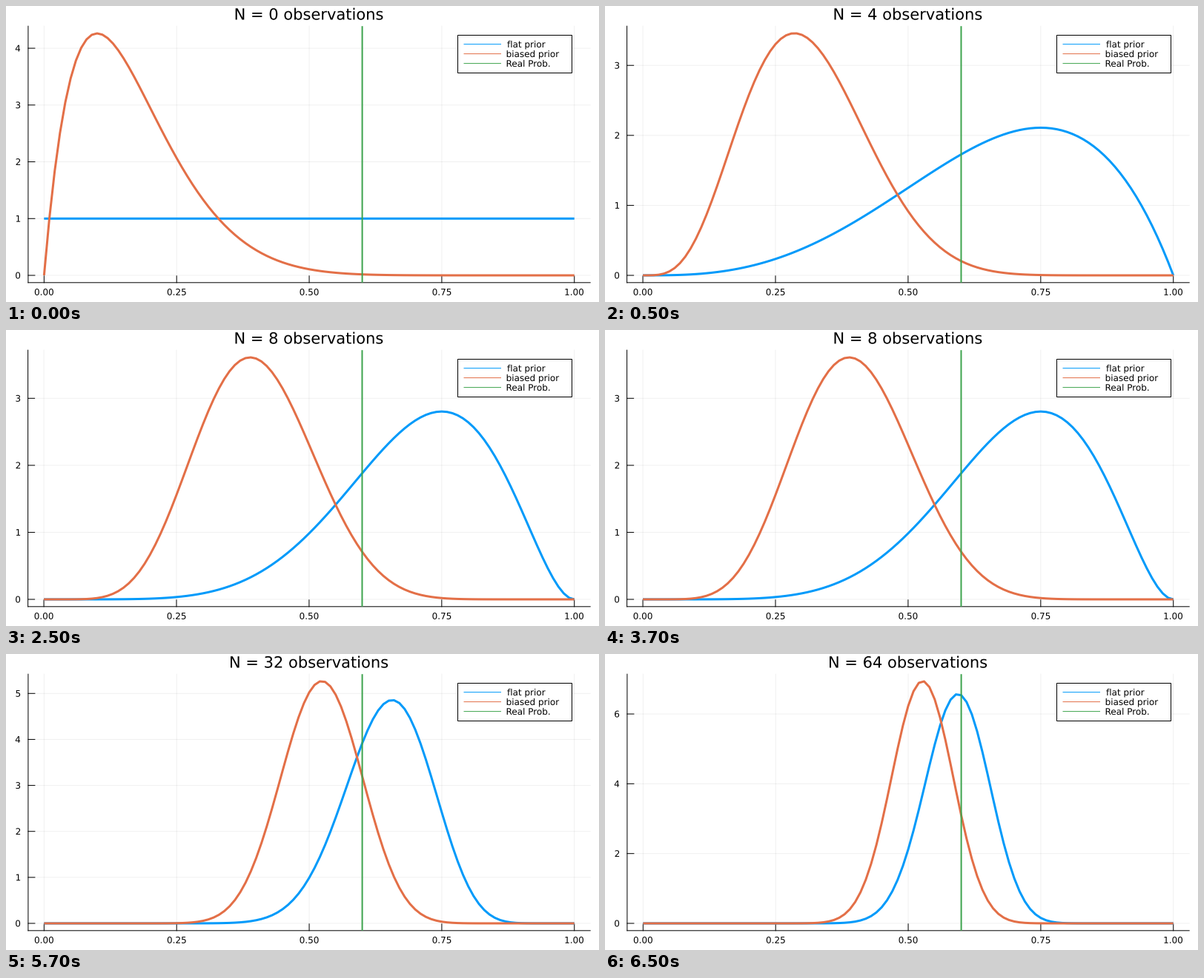
Animation of 800x400 px, one loop 8 s. Source, as a matplotlib script:

```python
import math

import matplotlib.pyplot as plt
import numpy as np
from matplotlib.animation import FuncAnimation
from matplotlib.patches import PathPatch, Rectangle
from matplotlib.path import Path
from matplotlib.textpath import TextPath

W, H, DPI = 800, 400, 100
STEP_MS, LOOP_MS = 500, 8000
BLUE, ORANGE, GREEN = "#009AFA", "#E36F47", "#3EA44E"
TOP, BOTTOM, RIGHT = 27.2, 373.8, 788.2
PAD = 0.03
REAL_PROB = 0.6
FLAT, BIASED = (1, 1), (2, 10)

# start time in ms, observations, successes, y tick step
STAGES = [(0, 0, 0, 1), (500, 4, 3, 1), (2500, 8, 6, 1),
          (4500, 32, 21, 1), (6500, 64, 38, 2)]

fig = plt.figure(figsize=(W / DPI, H / DPI), dpi=DPI, facecolor="white")
ax = fig.add_axes([0, 0, 1, 1])
grid_x = np.linspace(0, 1, 101)


def line(xs, ys, color, px, z=2, **style):
    ax.plot(xs, ys, color=color, lw=px * 72 / DPI, zorder=z, snap=False,
            solid_joinstyle="round", **style)


def label(x, baseline, text, size=12, align="center"):
    """Place text by the edges of its ink."""
    path = TextPath((0, 0), text, size=size, prop={"family": "DejaVu Sans"})
    box = path.get_extents()
    anchor = {"left": box.x0, "right": box.x1,
              "center": (box.x0 + box.x1) / 2}[align]
    verts = path.vertices * [1, -1] + [x - anchor, baseline]
    ax.add_patch(PathPatch(Path(verts, path.codes), fc="black", lw=0,
                           zorder=6, snap=False))


def beta_pdf(x, a, b):
    scale = math.gamma(a + b) / (math.gamma(a) * math.gamma(b))
    return scale * x ** (a - 1) * (1 - x) ** (b - 1)


def legend():
    ax.add_patch(Rectangle((609, 38.7), 154, 51.8, fc="white", ec="black",
                           lw=72 / DPI, zorder=4, snap=True))
    rows = [("flat prior", BLUE, 676.3), ("biased prior", ORANGE, 675.7),
            ("Real Prob.", GREEN, 675.7)]
    for i, (text, color, x) in enumerate(rows):
        y = 51.6 + 13 * i
        line([617.5, 668], [y, y], color, 1, 5, solid_capstyle="butt")
        label(x, y + 4.4, text, align="left")


def draw(frame):
    now = frame * STEP_MS
    _, n, hits, tick_step = [s for s in STAGES if s[0] <= now][-1]
    flat, biased = (beta_pdf(grid_x, a + hits, b + n - hits)
                    for a, b in (FLAT, BIASED))
    peak = max(flat.max(), biased.max())
    ticks = range(0, int(peak) + 1, tick_step)
    left = 29.9 if 4 in ticks else 29.6

    def px(x):
        return left + (RIGHT - left) * (x + PAD) / (1 + 2 * PAD)

    def py(y):
        return BOTTOM - (BOTTOM - TOP) * (y / peak + PAD) / (1 + 2 * PAD)

    ax.clear()
    ax.set(xlim=(0, W), ylim=(H, 0))
    ax.axis("off")

    for x in np.linspace(0, 1, 5):
        line([px(x)] * 2, [TOP, BOTTOM], "black", 1, 1, alpha=0.06)
        line([px(x)] * 2, [BOTTOM, BOTTOM - 9], "black", 1)
        label(px(x), 390.8, f"{x:.2f}")
    for y in ticks:
        line([left, RIGHT], [py(y)] * 2, "black", 1, 1, alpha=0.06)
        line([left, left + 9], [py(y)] * 2, "black", 1)
        label(19.1, py(y) + 4.4, str(y), align="right")

    line([left, left], [TOP, BOTTOM], "black", 1)
    line([left, RIGHT], [BOTTOM, BOTTOM], "black", 1)
    for ys, color in ((flat, BLUE), (biased, ORANGE)):
        line(px(grid_x), py(ys), color, 3, 3, solid_capstyle="butt")
    line([px(REAL_PROB)] * 2, [TOP, BOTTOM], GREEN, 2, 3,
         solid_capstyle="butt")

    label((left + RIGHT) / 2, 18.5, f"N = {n} observations", 21)
    legend()
    return []


anim = FuncAnimation(fig, draw, frames=LOOP_MS // STEP_MS, interval=STEP_MS,
                     init_func=lambda: [], repeat=True, repeat_delay=0)
plt.show()
```
